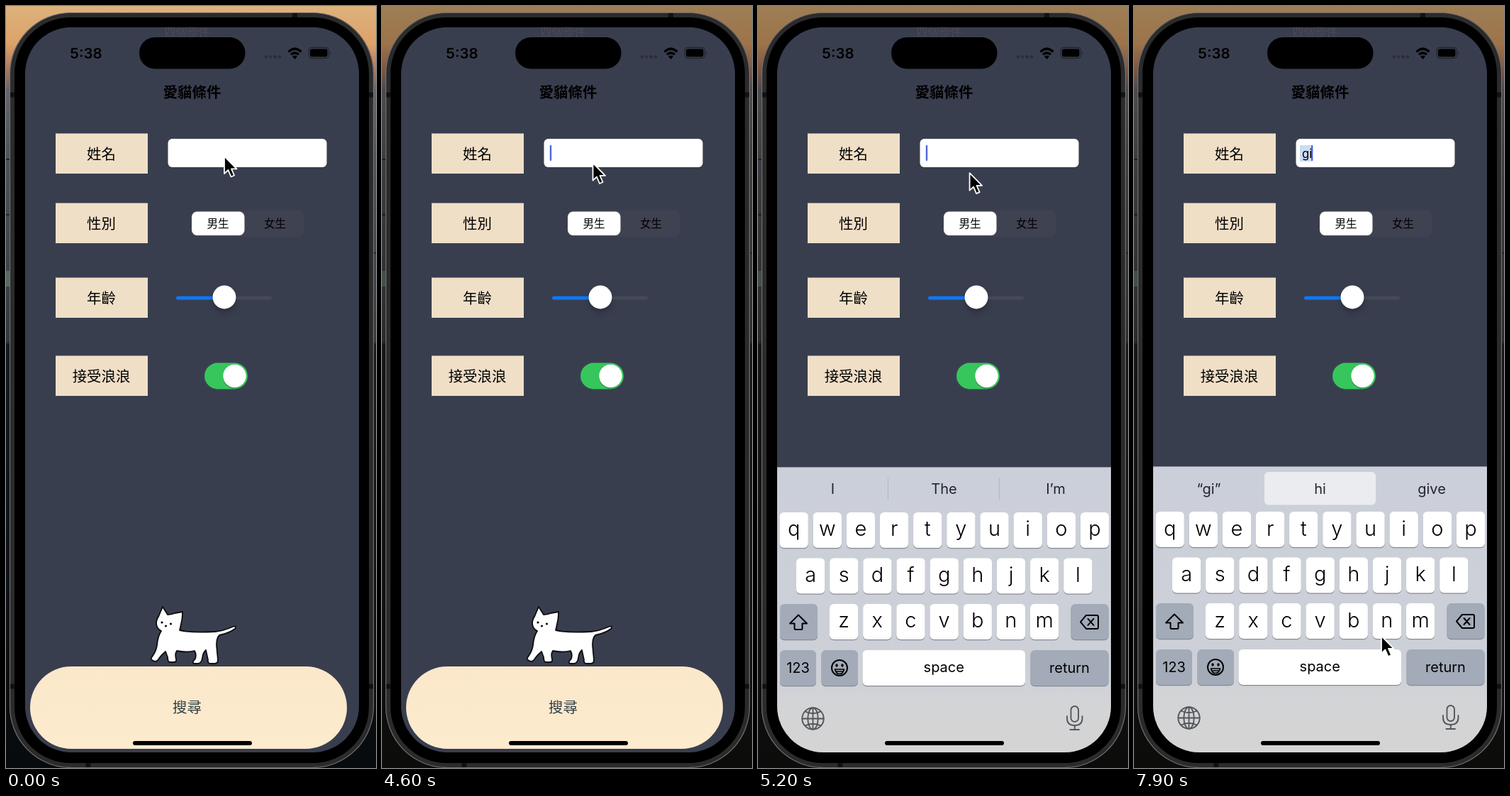
An HTML page for the animation above (8 s loop, 522 by 1073 pixels).

```html
<!DOCTYPE html>
<html lang="zh-Hant">
<head>
<meta charset="utf-8">
<title>愛貓條件</title>
<style>
  html, body { margin: 0; width: 100%; height: 100%; overflow: hidden; background: #0b0e11; }
  svg { display: block; width: 522px; height: 1073px; }
  text { font-family: Inter, "Noto Sans CJK TC", "Noto Sans CJK", sans-serif; text-anchor: middle; }
  .zh { font-family: "Noto Sans CJK TC", "Noto Sans CJK", "Noto Sans CJK JP", sans-serif; }
  .key { font-size: 29px; font-weight: 300; }
  .word { font-size: 20px; }
  .line { fill: none; stroke-linecap: round; stroke-linejoin: round; }
</style>
</head>
<body>
<svg viewBox="0 0 522 1073" xmlns="http://www.w3.org/2000/svg">
  <defs>
    <linearGradient id="sky" x2="0" y2="1">
      <stop offset="0" stop-color="#dcb27c"/>
      <stop offset=".05" stop-color="#dda268"/>
      <stop offset=".08" stop-color="#b27c62"/>
      <stop offset=".11" stop-color="#66656d"/>
      <stop offset=".2" stop-color="#4b535c"/>
      <stop offset=".44" stop-color="#33383c"/>
      <stop offset=".445" stop-color="#14191e"/>
      <stop offset="1" stop-color="#080b0d"/>
    </linearGradient>
    <linearGradient id="board" x2="0" y2="1">
      <stop offset="0" stop-color="#cbcfd9"/>
      <stop offset=".72" stop-color="#cdd0d7"/>
      <stop offset=".82" stop-color="#d3d4d6"/>
      <stop offset="1" stop-color="#d4d4d4"/>
    </linearGradient>
    <linearGradient id="cream" x2="0" y2="1">
      <stop offset="0" stop-color="#fbe8cb"/>
      <stop offset="1" stop-color="#fdebce"/>
    </linearGradient>
    <filter id="soft" x="-60%" y="-60%" width="220%" height="220%"><feGaussianBlur stdDeviation="5"/></filter>
    <clipPath id="screen"><rect x="27" y="30" width="471" height="1021" rx="65"/></clipPath>
  </defs>

  <rect width="522" height="1073" fill="url(#sky)"/>
  <path d="M0 216H5M0 294H5M519 348H522" stroke="#15181b" stroke-width="1.5"/>
  <rect y="373" width="5" height="22" fill="#586a66"/>
  <rect id="shade" width="522" height="1073" fill="#181008"/>

  <rect x="5.5" y="9.5" width="513" height="1063" rx="86" fill="#2b2b2c" stroke="#707070" stroke-width="1.2"/>
  <path d="M6 125H12M512 125H518M6 958H12M512 958H518M407.500 10V16M116 1066V1072" stroke="#111" stroke-width="7"/>
  <rect x="12" y="16" width="500" height="1050" rx="79" fill="#000"/>

  <g clip-path="url(#screen)">
    <rect x="27" y="30" width="471" height="1021" fill="#393e4f"/>
    <text class="zh" x="255.500" y="42" font-size="16" fill="#574c54" opacity=".75">四個部件</text>
    <rect x="188" y="44" width="149.500" height="44.500" rx="22" fill="#000"/>
    <text x="113" y="73.500" font-size="20.500" font-weight="600">5:38</text>
    <g id="signal" fill="#2a2e3b"></g>
    <g class="line" stroke="#000" stroke-width="3.200" style="stroke-linecap:butt">
      <path d="M398.500 64.500Q407.500 56 416.500 64.500M402 68.500Q407.500 63.500 413 68.500"/>
    </g>
    <path d="M404 71Q407.500 68 411 71L407.500 75Z"/>
    <rect x="427" y="58.500" width="28.500" height="15" rx="4.500" fill="none" stroke="#22252f" stroke-width="1.300"/>
    <rect x="429" y="60.500" width="24.500" height="11" rx="2.800"/>
    <path d="M457.500 63.500Q460 66 457.500 68.500Z" fill="#22252f"/>
    <text class="zh" x="262.500" y="129" font-size="20.400" font-weight="700">愛貓條件</text>

    <g id="labels"></g>
    <rect x="228.500" y="187" width="224" height="40" rx="6" fill="#fff"/>
    <rect id="mark" x="234" y="196" width="18" height="23" fill="#cbdcf5"/>
    <text id="typed" x="237" y="213.500" font-size="16.800" style="text-anchor:start"></text>
    <rect id="caret" y="196" width="2.400" height="22" rx="1" fill="#4a66dd"/>

    <rect x="261" y="287.500" width="159" height="38" rx="9" fill="#3f4251"/>
    <rect x="262" y="289.500" width="74.500" height="33.500" rx="7.500" fill="#fff"/>
    <text class="zh" x="299" y="312" font-size="15.600" font-weight="500">男生</text>
    <text class="zh" x="379.500" y="312" font-size="15.600">女生</text>

    <rect x="240" y="408.700" width="135" height="4.800" rx="2.400" fill="#464a57"/>
    <rect x="240" y="408.700" width="70" height="4.800" rx="2.400" fill="#0b79fb"/>
    <circle cx="308" cy="415" r="16" opacity=".28" filter="url(#soft)"/>
    <circle cx="308" cy="410" r="16.400" fill="#fff"/>

    <rect x="280" y="502.500" width="61" height="37" rx="18.500" fill="#36c65c"/>
    <circle cx="322" cy="523" r="16" opacity=".18"/>
    <circle cx="322.500" cy="521" r="16.200" fill="#fff"/>

    <path d="M221 846L228 857Q234 857 238 855L249 853Q249 863 247 870Q246 876 245 879Q262 883 295 881
      Q306 880 320 874Q326 872 323 877Q315 883 301 886Q297 890 297 900L299 921Q299 926 294 926L288 926
      Q284 925 285 921L282 907Q278 910 277 918Q276 925 271 926L265 926Q262 924 267 919Q269 913 266 908
      Q255 911 241 908Q238 912 240 920Q241 924 236 924L231 924Q228 923 228 917L225 909Q219 914 215 920
      Q212 925 206 921Q203 919 207 915Q212 908 213 900Q214 888 219 880Q212 877 212 868Q213 862 215 860
      Q218 853 221 846Z" fill="#fff" stroke="#0c0d10" stroke-width="1.800" stroke-linejoin="round"/>
    <circle cx="220" cy="868" r="1.600"/><circle cx="232.500" cy="870" r="1.600"/><circle cx="225.500" cy="873" r="1.500"/>

    <rect x="34" y="930" width="447" height="116" rx="58" fill="url(#cream)"/>
    <text class="zh" x="255.500" y="995" font-size="20.400" fill="#2f3f47">搜尋</text>

    <g id="keyboard">
      <rect x="27" y="648.500" width="471" height="403" fill="url(#board)"/>
      <path id="split" d="M183.500 663.500V694M340.500 663.500V694" stroke="#b4b8c1" stroke-width="1.200"/>
      <rect id="pick" x="184" y="656" width="157" height="46.500" rx="6" fill="#ebecf0"/>
      <g id="words" fill="#22252b"></g>
      <g id="keys"></g>
      <g class="line" stroke="#000" stroke-width="2">
        <path d="M57 856.500L69 868.500H62.500V875.500Q62.500 877 61 877H53Q51.500 877 51.500 875.500V868.500H45Z"/>
        <path d="M463 857H478Q480 857 480 859V874Q480 876 478 876H463L455 866.500ZM465.500 862L473.500 871M473.500 862L465.500 871"/>
        <circle cx="115" cy="931" r="11"/>
        <path d="M108.500 933H121.500Q120 939.500 115 939.500Q110 939.500 108.500 933ZM109.500 936H120.500" stroke-width="1.600"/>
      </g>
      <ellipse cx="111" cy="927.500" rx="1.700" ry="2.300"/><ellipse cx="119" cy="927.500" rx="1.700" ry="2.300"/>
      <g class="line" stroke="#55575c" stroke-width="1.900">
        <circle cx="77.500" cy="1002.500" r="15.200"/>
        <ellipse cx="77.500" cy="1002.500" rx="7.200" ry="15.200"/>
        <path d="M62.500 1002.500H92.500M77.500 987.500V1017.500M66.500 992.500Q77.500 998 88.500 992.500M66.500 1012.500Q77.500 1007 88.500 1012.500"/>
        <rect x="441.500" y="985" width="10.500" height="22" rx="5.250"/>
        <path d="M436 999V1002Q436 1012 446.800 1012Q457.500 1012 457.500 1002V999M446.800 1012V1018M440.500 1018H453"/>
      </g>
    </g>
    <rect x="179" y="1035" width="168" height="6" rx="3"/>
  </g>

  <path id="cursor" d="M0 0V24.500L5.500 19.500L9.500 29L14 27L10 17.800H17.500Z" stroke="#fff" stroke-width="1.800" stroke-linejoin="round"/>
</svg>
<script>
const LOOP = 8000, STEP = 100;
const $ = id => document.getElementById(id);
const clamp = v => Math.max(0, Math.min(1, v));

function add(parent, tag, attrs, text) {
  const el = document.createElementNS("http://www.w3.org/2000/svg", tag);
  for (const k in attrs) el.setAttribute(k, attrs[k]);
  if (text) el.textContent = text;
  return parent.appendChild(el);
}

for (let i = 0; i < 4; i++) add($("signal"), "circle", { cx: 367 + i * 6.4, cy: 71.5, r: 2.3 });

[["姓名", 180], ["性別", 278], ["年齡", 383], ["接受浪浪", 493]].forEach(([name, y]) => {
  add($("labels"), "rect", { x: 70, y: y - .5, width: 130, height: 56.5, fill: "#f0dfc7" });
  add($("labels"), "text", { class: "zh", x: 134.5, y: y + 35.5, "font-size": 20.4 }, name);
});

function addKey(x, y, w, fill, label, cls, base) {
  add($("keys"), "rect", { x, y: y + 1.3, width: w, height: 50, rx: 6, fill: "#868a92" });
  add($("keys"), "rect", { x, y, width: w, height: 50, rx: 6, fill });
  if (label) add($("keys"), "text", { class: cls, x: x + w / 2, y: y + base }, label);
}
const GREY = "#a3abb9";
[["qwertyuiop", 30.5, 712], ["asdfghjkl", 54, 776.5], ["zxcvbnm", 101, 841]].forEach(([row, x, y]) =>
  [...row].forEach((c, i) => addKey(x + i * 47.15, y, 40.3, "#fff", c, "key", 33.5)));
addKey(31, 841, 53, GREY);
addKey(441.5, 841, 53, GREY);
addKey(31, 906, 51, GREY, "123", "word", 32);
addKey(89.5, 906, 51.5, GREY);
addKey(147.5, 906, 229.5, "#fff", "space", "word", 31);
addKey(384.5, 906, 110, GREY, "return", "word", 32);

const slots = [105.5, 262.5, 420].map(x => add($("words"), "text", { class: "word", x, y: 686.5 }));
const rest = add($("words"), "text", { class: "word", x: 411, y: 686.5 }, "I");

// start time, suggestions, and the order in which letters of the last one grow in
const hints = [
  [-9999, ["I", "The", "I’m"], [0, 1, 2]],
  [7160, ["“g”", "good", "go"], [2, 0]],
  [7560, ["“gi”", "hi", "give"], [0, 1, 2, 3]]
];

function drawHints(t) {
  const [start, words, order] = hints.filter(h => h[0] <= t).pop();
  const grow = i => clamp((t - start) / 100 - i * .4);
  slots.forEach((slot, n) => {
    slot.textContent = "";
    [...words[n]].forEach((c, i) => {
      const p = grow(n === 2 ? order[i] : i);
      add(slot, "tspan", { "font-size": 13 + 7 * p, opacity: p, "fill-opacity": p }, c);
    });
  });
  rest.setAttribute("opacity", start === 7160 ? 1 - grow(2) : 0);
}

// [time, value...] tables; each span is eased
function track(steps, t, ease) {
  let i = steps.findIndex(s => s[0] > t);
  if (i < 0) return steps[steps.length - 1].slice(1);
  if (i === 0) return steps[0].slice(1);
  const a = steps[i - 1], b = steps[i];
  let k = (t - a[0]) / (b[0] - a[0]);
  if (ease) k = k * k * (3 - 2 * k);
  return a.slice(1).map((v, n) => v + (b[n + 1] - v) * k);
}

const pointer = [
  [1000, 308, 211.5], [1450, 310, 204.5], [1950, 310, 204.5], [2300, 304, 203],
  [3400, 304, 203], [3700, 297.5, 221], [5150, 297.5, 221], [5650, 336, 726],
  [5700, 336, 726], [6000, 374, 786], [6350, 364, 760.5],
  [7350, 364, 760.5], [7880, 349, 887]
];
const blink = [
  [3350, 0], [3450, 1], [3950, 1], [4200, 0], [4350, 0], [4600, 1],
  [5620, 1], [5780, 0], [6150, 0], [6350, 1], [6620, 1], [6800, 0], [7050, 0], [7150, 1]
];
const dim = [[50, 0], [900, .32]];

function keyboardDrop(t) {
  const p = (t - 4750) * .0184;
  return p <= 0 ? 1 : p > 10 ? 0 : (1 + p) * Math.exp(-p);
}

function draw(t) {
  const [x, y] = track(pointer, t, true);
  $("cursor").setAttribute("transform", `translate(${x} ${y})`);
  $("shade").setAttribute("opacity", track(dim, t)[0]);

  const typed = t < 7160 ? "" : t < 7560 ? "g" : "gi";
  const marked = t >= 7660;
  $("typed").textContent = typed;
  $("caret").setAttribute("x", [236.8, 246, 250][typed.length]);
  $("caret").setAttribute("opacity", track(blink, t)[0]);
  $("mark").setAttribute("opacity", marked ? 1 : 0);
  $("pick").setAttribute("opacity", marked ? 1 : 0);
  $("split").setAttribute("opacity", marked ? 0 : 1);

  const drop = keyboardDrop(t);
  $("keyboard").setAttribute("transform", `translate(0 ${drop * 403})`);
  $("keyboard").setAttribute("visibility", drop < 1 ? "visible" : "hidden");
  drawHints(t);
}

// the board leaves no gap below while it overshoots its resting place
const t0 = performance.now();
let last = -1;
function tick() {
  const t = Math.floor(((performance.now() - t0) % LOOP) / STEP) * STEP;
  if (t !== last) draw(last = t);
  requestAnimationFrame(tick);
}
draw(0);
requestAnimationFrame(tick);
</script>
</body>
</html>
```
